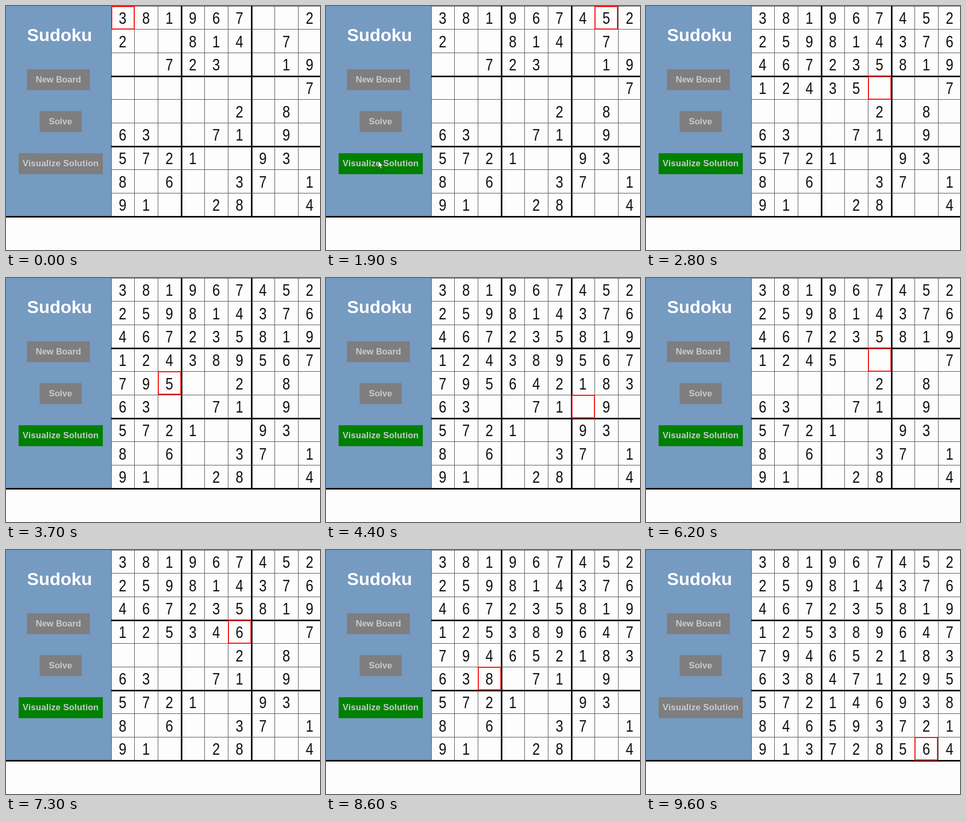
Animation of 600x466 px, one loop 10000 ms. Source, as an HTML page:

```html
<!DOCTYPE html>
<html lang="en">
<head>
<meta charset="utf-8">
<title>Sudoku</title>
<style>
html, body { margin: 0; width: 100%; height: 100%; overflow: hidden; background: #fefdfe; }
svg { display: block; width: 600px; height: 466px; }
text { font-family: "Liberation Sans", Arial, sans-serif; text-anchor: middle; }
.label { font-weight: bold; font-size: 16.6px; fill: #cbcbcb; }
.title { font-weight: bold; font-size: 34px; fill: #fff; }
.digit { font-size: 32px; fill: #111; }
</style>
</head>
<body>
<svg id="stage" viewBox="0 0 600 466">
  <rect width="600" height="466" fill="#fefdfe"/>
  <rect width="201" height="401.5" fill="#769bc1"/>
  <text class="title" x="102.3" y="66.5">Sudoku</text>
</svg>
<script>
const LOOP = 10000, FRAME = 100, LEFT = 201, CELL = 402 / 9;
const GRAY = "#7e7d7f", GREEN = "#008000";
const PUZZLE = [
  "381967002", "200814070", "007230019",
  "000000007", "000002080", "630071090",
  "572100930", "806003701", "910028004"
].join("");

const stage = document.getElementById("stage");

function add(tag, attrs, content) {
  const el = document.createElementNS("http://www.w3.org/2000/svg", tag);
  for (const key in attrs) el.setAttribute(key, attrs[key]);
  if (content) el.textContent = content;
  stage.append(el);
  return el;
}

function addButton(x, y, width, label, spacing) {
  const box = add("rect", { x, y, width, height: 40, fill: GRAY });
  add("text", { class: "label", x: 100 + spacing / 2, y: y + 25, "letter-spacing": spacing }, label);
  return box;
}

addButton(40, 120.7, 120.5, "New Board", 0);
addButton(64.3, 200.8, 80.3, "Solve", 0).nextSibling.setAttribute("x", 104);
const visualize = addButton(24.2, 281.2, 160.8, "Visualize Solution", 0.2);
visualize.nextSibling.setAttribute("x", 104.5);

// Grid lines, heavier around the 3 by 3 blocks
for (let i = 0; i <= 9; i++) {
  const heavy = i > 0 && i % 3 === 0;
  const size = heavy ? 3 : 1;
  const at = Math.floor(i * CELL + 0.01) - (heavy ? 1 : 0);
  const fill = heavy ? "#000" : "#555";
  const x = i === 9 ? 0 : LEFT;
  add("rect", { x: LEFT + at, y: 0, width: size, height: 401, fill });
  add("rect", { x, y: at, width: 600 - x, height: size, fill });
}

const digits = [...PUZZLE].map((_, i) => {
  const x = LEFT - 0.5 + (i % 9 + 0.5) * CELL;
  const y = Math.floor(i / 9) * CELL + 34;
  return add("text", { class: "digit", transform: `translate(${x} ${y}) scale(.82 1)` });
});

const marker = add("rect", { width: 43, height: 43, fill: "none", stroke: "#f01010", "stroke-width": 2 });
const pointer = add("path", {
  d: "M0 0V12.5L3 10L5 15L7 14L5 9.3H9Z", fill: "#fff", stroke: "#222", "stroke-width": 0.7
});

// Backtracking search, recording every placed and cleared digit
const steps = [];

function fits(board, cell, value) {
  const row = Math.floor(cell / 9), col = cell % 9;
  return board.every((other, i) => {
    if (other !== value) return true;
    const r = Math.floor(i / 9), c = i % 9;
    const sameBlock = Math.floor(r / 3) === Math.floor(row / 3) && Math.floor(c / 3) === Math.floor(col / 3);
    return r !== row && c !== col && !sameBlock;
  });
}

function solve(board) {
  const cell = board.indexOf(0);
  if (cell < 0) return true;
  for (let value = 1; value <= 9; value++) {
    if (!fits(board, cell, value)) continue;
    board[cell] = value;
    steps.push([cell, value]);
    if (solve(board)) return true;
    board[cell] = 0;
    steps.push([cell, 0]);
  }
  return false;
}

const givens = [...PUZZLE].map(Number);
solve(givens.slice());

// Linear interpolation through [time, ...values] keys
function track(keys, time, part = 1) {
  if (time <= keys[0][0]) return keys[0][part];
  for (let i = 1; i < keys.length; i++) {
    const a = keys[i - 1], b = keys[i];
    if (time <= b[0]) return a[part] + (b[part] - a[part]) * (time - a[0]) / (b[0] - a[0]);
  }
  return keys[keys.length - 1][part];
}

const PACE = [[1780, 0], [1900, 2], [3700, 33], [5100, 58], [7300, 98], [8600, 122], [9000, 129.5], [9450, 136]];
const PATH = [[1400, 139, 442], [1500, 112, 330], [1600, 100, 296], [2200, 100, 296], [2300, 120, 375], [2400, 139, 442]];

function render(ms) {
  const time = Math.floor(ms / FRAME) * FRAME;
  const count = Math.floor(track(PACE, time) + 0.01);
  const board = givens.slice();
  let selected = 0;
  for (const [cell, value] of steps.slice(0, count)) {
    board[cell] = value;
    if (value) selected = cell;
  }
  digits.forEach((el, i) => {
    const label = board[i] ? String(board[i]) : "";
    if (el.textContent !== label) el.textContent = label;
  });
  marker.setAttribute("x", Math.floor(LEFT + selected % 9 * CELL + 0.01) + 1);
  marker.setAttribute("y", Math.floor(Math.floor(selected / 9) * CELL + 0.01) + 1);
  visualize.setAttribute("fill", time >= 1500 && time < 9600 ? GREEN : GRAY);
  pointer.setAttribute("visibility", time >= 1400 && time < 2500 ? "visible" : "hidden");
  pointer.setAttribute("transform", `translate(${track(PATH, time)} ${track(PATH, time, 2)})`);
}

const start = performance.now();
function tick() {
  render((performance.now() - start) % LOOP);
  requestAnimationFrame(tick);
}
tick();
</script>
</body>
</html>
```
